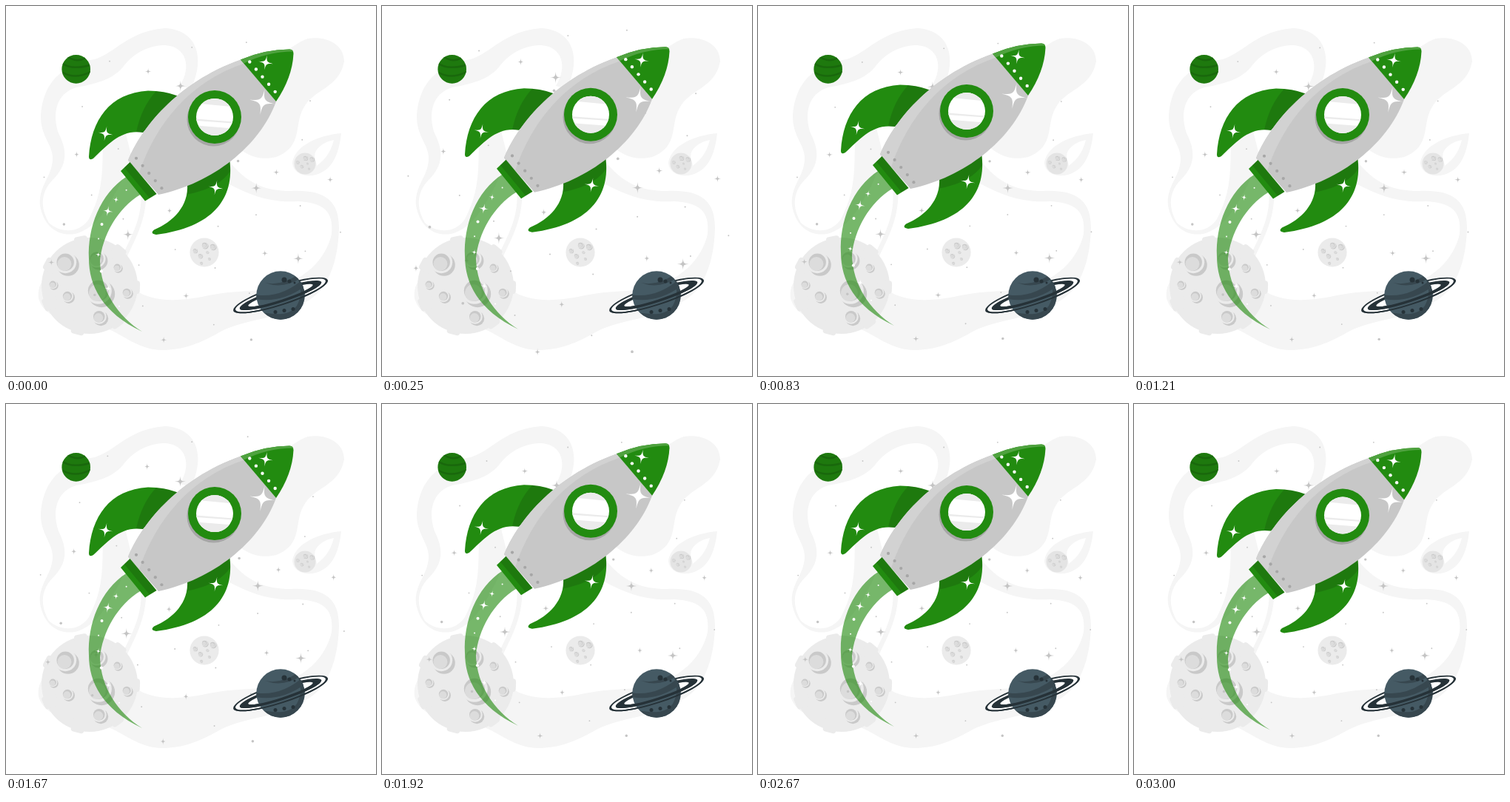
An HTML page for the animation above (3.04 s loop, 500 px wide and 500 px high).

```html
<!DOCTYPE html>
<html lang="en">
<head>
<meta charset="utf-8">
<title>Rocket</title>
<style>
html, body { margin: 0; width: 100%; height: 100%; overflow: hidden; background: #fff; }
svg { display: block; width: 100%; height: 100%; }
.green { fill: #228b10; }
.shade { fill: #000; fill-opacity: .13; }
</style>
</head>
<body>
<svg viewBox="0 0 500 500">
  <defs>
    <clipPath id="pane"><circle cx="282" cy="150.5" r="25"/></clipPath>
    <clipPath id="globe"><circle cx="371" cy="391" r="32.7"/></clipPath>
    <clipPath id="leaf"><circle cx="94.7" cy="85.4" r="19.3"/></clipPath>
    <clipPath id="front"><rect x="-75" y="0" width="150" height="40"/></clipPath>
  </defs>

  <g fill="#f5f5f5">
    <path d="M250 112C270 70 258 32 215 30C165 34 150 62 120 72C85 78 50 95 47 150C47 180 68 190 62 215C58 235 44 245 46 270C52 302 75 313 97 307C124 297 135 275 152 245L170 205L160 165L133 165C127 200 138 240 112 288C98 309 72 306 58 293C42 265 52 245 66 232C86 210 80 190 71 172C62 145 68 118 95 110C130 104 148 96 160 80C178 58 200 53 215 53C244 55 251 82 235 108Z"/>
    <path d="M182 245C186 285 170 310 156 340L164 338C176 312 192 285 189 245Z"/>
    <path d="M300 208C325 240 350 250 385 250C430 248 450 262 450 300C449 345 435 385 405 400C365 425 325 422 290 440C262 456 240 465 210 465C175 464 155 440 130 434C95 430 52 425 44 395C42 380 50 365 65 355L165 378C200 405 240 398 280 390C305 385 330 386 350 383C405 374 433 340 440 308C443 278 430 266 395 264C350 267 320 250 296 238Z"/>
    <path d="M300 175C320 205 345 209 365 204C402 190 389 160 402 138C415 112 450 112 457 75C457 50 430 40 408 44C390 50 375 65 350 85Z"/>
    <path d="M387 212C390 188 425 174 453 172C451 190 446 214 428 224C410 235 388 228 387 212Z"/>
  </g>
  <path d="M418 207C414 195 427 184 443 181C440 193 434 206 420 216Z" fill="#fff"/>

  <g id="moons"></g>

  <circle class="green" cx="94.7" cy="85.4" r="19.3"/>
  <g clip-path="url(#leaf)">
    <rect class="shade" x="75" y="65" width="40" height="40"/>
    <path d="M74 76Q88 88 116 79M77 90Q94 100 116 88M84 69Q96 77 108 70" fill="none" stroke="#19680c" stroke-width="2.5"/>
  </g>

  <g id="stars" fill="#c4c4c4"></g>

  <g id="ringBack" transform="translate(371 391) rotate(-18)"></g>
  <circle cx="371" cy="391" r="32.7" fill="#455a64"/>
  <g clip-path="url(#globe)" fill="#37474f">
    <path d="M383 356C399 367 402 390 393 405C381 421 362 416 345 414L365 428L412 420L410 360Z"/>
    <path d="M337 390Q372 396 405 366L405 378Q372 402 338 396ZM350 374Q372 379 396 362L398 368Q374 383 350 374Z"/>
    <g id="spots" fill="#263238"></g>
  </g>
  <g id="ringFront" transform="translate(371 391) rotate(-18)" clip-path="url(#front)"></g>

  <g id="rocket">
    <path class="green" opacity=".62" d="M163 231C127 254 110 300 112 342C112 378 130 415 184 440.500C151 420 128 385 127 345C130 312 150 274 182 255Z"/>
    <path class="green" d="M112 204C115 155 140 118 192 115Q214 115 232 122L185 171.500C155 167 138 188 118 206.500Q112 210 112 204Z"/>
    <path class="shade" d="M203 115.500Q219 117 232 122L185 171.500L176 171Q183 137 203 115.500Z"/>
    <path class="green" d="M302 207C310 262 278 300 203 309.500Q194 308 200 303C226 292 247 271 245 241Z"/>
    <path class="shade" d="M302 207L245 241L245 255C268 251 291 241 303 224Z"/>
    <path d="M165 209C181 169 229 104 317.500 73L365 129.500C343 190 279 240 206 255.500Z" fill="#c7c7c7"/>
    <path d="M165 209C181 169 229 104 317.500 73L322 78C249 102 202 160 180 226Z" fill="#d2d2d2"/>
    <path class="green" d="M317 73Q350 59 383 59Q388.500 59 388.500 65Q387 97 365 129.500Z"/>
    <path d="M317 73Q350 59 383 59Q387 59 388 62Q354 62 321.500 78Z" fill="#4fa23f"/>
    <path class="green" d="M155 223.500L167.500 211.500L203.500 254.500L188 264Z"/>
    <path class="shade" d="M160 219L167.500 211.500L203.500 254.500L194 260Z"/>
    <circle cx="280.500" cy="154" r="36" fill="#a6a6a6"/>
    <circle class="green" cx="282" cy="150.500" r="36"/>
    <circle cx="282" cy="150.500" r="25" fill="#fff"/>
    <path clip-path="url(#pane)" d="M256 132L308 137V125H256ZM256 153L308 157V159L256 155.500ZM256 162L308 166V180H256Z" fill="#ebebeb"/>
    <g id="rivets"></g>
    <g id="glints" fill="#fff"></g>
  </g>
</svg>
<script>
const $ = id => document.getElementById(id);
const each = (list, draw) => list.map(draw).join('');
const repeat = (count, draw) => Array.from({ length: count }, (_, i) => draw(i)).join('');
const circle = (x, y, r, fill = 'inherit') => `<circle cx="${x}" cy="${y}" r="${r}" style="fill:${fill}"/>`;

// Four thin arms, each side pinched towards the centre
function sparkle(x, y, size, turn = 0) {
  const arm = '1 0C.16 .05 .05 .16 0 1C-.05 .16 -.16 .05 -1 0C-.16 -.05 -.05 -.16 0 -1C.05 -.16 .16 -.05 1 0Z';
  return `<path transform="translate(${x} ${y}) rotate(${turn}) scale(${size})" d="M${arm}"/>`;
}

// Calls place(x, y, i) over a disc filled evenly by the golden angle
const scatter = (cx, cy, radius, count, place) => repeat(count, i => {
  const r = radius * Math.sqrt((i + .5) / count), a = i * 2.4;
  return place(cx + r * Math.cos(a), cy + r * Math.sin(a), i);
});

function crater(x, y, r, base = '#ebebeb') {
  const d = r * .12;
  return circle(x + d, y + d, r, '#c9c9c9') + circle(x - d, y - d, r, base) +
    circle(x - d, y - d, r * .78, '#c9c9c9') + circle(x - d * 1.7, y + d * .3, r * .63, '#dcdcdc');
}

const pockedBall = (x, y, r, count, base) => circle(x, y, r, base) +
  scatter(x, y, r * .8, count, (px, py, i) => crater(px, py, r * (.1 + .06 * (i % 3)), base));

const bigCraters = [[82, 348, 15], [124, 343, 12], [151, 354, 6], [64, 377, 6],
  [84, 393, 8], [127, 387, 18], [164, 388, 7], [127, 421, 10]];
$('moons').innerHTML = `<g fill="#ebebeb">${circle(113, 378, 65)}` +
  repeat(7, i => `<rect x="48" y="-9" width="20" height="18" rx="4" transform="translate(113 378) rotate(${2 + i * 360 / 7})"/>`) +
  '</g>' + each(bigCraters, c => crater(...c)) +
  pockedBall(268, 333, 19.6, 7, '#ebebeb') +
  pockedBall(404, 213, 14.5, 6, '#e4e4e4');

const brightStars = [[236, 110], [166, 308], [337, 246], [393, 340]];
$('stars').innerHTML = each(brightStars, ([x, y]) => sparkle(x, y, 7.2)) +
  scatter(250, 250, 215, 46, (x, y, i) =>
    i % 3 === 1 ? sparkle(x, y, 4.6) : circle(x, y, i % 5 ? .9 : 1.7));

const ellipse = (rx, ry) => `M${-rx} 0A${rx} ${ry} 0 0 1 ${rx} 0A${rx} ${ry} 0 0 1 ${-rx} 0Z`;
const ring = `<path d="${ellipse(67, 13.5)}${ellipse(64, 11.5)}${ellipse(58, 9.5)}${ellipse(46, 6)}" fill="#263238" fill-rule="evenodd"/>`;
$('ringBack').innerHTML = `<path d="${ellipse(66, 13)}" fill="#fff"/>${ring}`;
$('ringFront').innerHTML = ring;
$('spots').innerHTML = repeat(3, i =>
  circle(376 + 7 * i, 370 + 2 * i, 3.5 - i) + circle(364 + 12 * i, 413.5 - 2 * i, 2.5));

$('rivets').innerHTML = repeat(5, i => {
  const dx = 8.6 * i, dy = 10.1 * i;
  return circle(176 + dx, 206.3 + dy, 2.1, '#a6a6a6') + circle(329.3 + dx, 76 + dy, 2.2, '#fff');
});

const bezier = (a, b, c, d, t) => {
  const s = 1 - t;
  return a * s ** 3 + 3 * b * s * s * t + 3 * c * s * t * t + d * t ** 3;
};
const trailGlints = [1, 4.5, 7, 2, 1, 4, 2, 5, 1];
$('glints').innerHTML =
  each([[351, 77, 10], [346.5, 130, 17.5], [134.5, 173, 10], [283.5, 246, 10]],
    star => sparkle(...star, 10)) +
  each(trailGlints, (size, i) => {
    const t = .06 + .1 * i;
    const x = bezier(172, 118, 95, 184, t), y = bezier(243, 275, 360, 440, t);
    return size > 3 ? sparkle(x, y, size, 10) : circle(x, y, size);
  });

const LOOP = 3040, FRAMES = 73, STEP = 1000 / 24;

// Linear rise to 1 and back to 0
const tent = (p, from, peak, to) =>
  Math.max(0, Math.min((p - from) / (peak - from), (to - p) / (to - peak)));

function render(time) {
  // 24 pictures per second
  const step = Math.min(FRAMES - 1, Math.floor((time % LOOP + 5) / STEP));
  const p = (step + 1) / FRAMES;
  const lift = 10 * tent(p % .5, 0, .25, .5);
  const pulse = 1 + .1 * (tent(p, 0, .1, .3) + tent(p, .4, .5, .6));
  $('rocket').setAttribute('transform', `translate(0 ${-lift})`);
  $('stars').setAttribute('transform', `translate(250 250) scale(${pulse}) translate(-250 -250)`);
}

const start = performance.now();
function tick() {
  render(performance.now() - start);
  requestAnimationFrame(tick);
}
tick();
</script>
</body>
</html>
```
